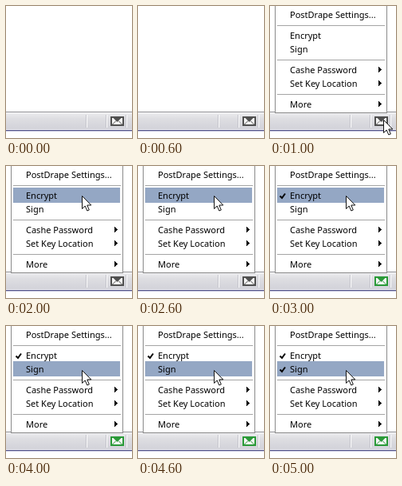
Write an HTML page that moves like this. It is 158x165 px and loops after 6000 ms.

```html
<!DOCTYPE html>
<html lang="en">
<head>
<meta charset="utf-8">
<title>Status bar mail menu</title>
<style>
  html, body { margin: 0; width: 100%; height: 100%; overflow: hidden; background: #fff; }
  svg { display: block; width: 158px; height: 165px; }
  text { font: 11px "Noto Sans", "Open Sans", sans-serif; fill: #000; }
  .crisp { shape-rendering: crispEdges; }
  .plain { color: #505050; }
  .secure { color: #2a9a38; }

  .menu, .highlight, .cursor, .tick, .secure { animation: 6s step-end infinite; }
  .menu { animation-name: open; }
  .highlight { animation-name: hover; }
  .cursor { animation-name: point; }
  .tick, .secure { animation-name: encrypt; }
  .tick.signed { animation-name: sign; }

  @keyframes open {
    0% { visibility: hidden; }
    16.666%, 100% { visibility: visible; }
  }
  @keyframes hover {
    0% { visibility: hidden; transform: none; }
    33.333% { visibility: visible; transform: none; }
    66.666%, 100% { visibility: visible; transform: translateY(17px); }
  }
  @keyframes point {
    0% { visibility: hidden; transform: translate(142px, 142px); }
    16.666% { visibility: visible; transform: translate(142px, 142px); }
    33.333% { visibility: visible; transform: translate(95px, 37px); }
    66.666%, 100% { visibility: visible; transform: translate(95px, 55px); }
  }
  @keyframes encrypt {
    0% { visibility: hidden; }
    50%, 100% { visibility: visible; }
  }
  @keyframes sign {
    0% { visibility: hidden; }
    83.333%, 100% { visibility: visible; }
  }
</style>
</head>
<body>
<svg viewBox="0 0 158 165">
  <defs>
    <linearGradient id="bar" x2="0" y2="1">
      <stop offset="0" stop-color="#efeff1"/>
      <stop offset=".4" stop-color="#dedee2"/>
      <stop offset="1" stop-color="#d2d2d9"/>
    </linearGradient>
    <path id="arrow" class="crisp" d="M0 -4L4 0L0 4Z"/>
    <path id="check" d="M0 3.5L2.5 6L6.5 .5" fill="none" stroke="#000" stroke-width="2"/>
    <g id="divider" class="crisp">
      <path d="M.5 136V152" stroke="#c2c2ca"/>
      <path d="M1.5 136V152" stroke="#fff"/>
    </g>
    <g id="envelope">
      <rect width="17" height="12" fill="currentColor"/>
      <rect x="2" y="2" width="13" height="8" fill="#f6f6f6"/>
      <path d="M3.5 2H13.5L8.5 7Z" fill="currentColor"/>
      <path d="M2 10.5L7 5.5M15 10.5L10 5.5" stroke="currentColor"/>
    </g>
  </defs>

  <!-- Status bar -->
  <g class="crisp">
    <rect y="132" width="158" height="22" fill="url(#bar)"/>
    <path d="M0 132.5H158" stroke="#8f8f94"/>
    <path d="M0 133.5H158" stroke="#fafafa"/>
    <path d="M0 154.5H158" stroke="#ececf2"/>
    <path d="M0 155.5H158" stroke="#55558a"/>
    <path d="M0 156.5H158" stroke="#c4c4dc"/>
  </g>
  <use href="#divider" x="100"/>
  <use href="#divider" x="125"/>
  <use href="#divider" x="150"/>
  <use class="plain" href="#envelope" x="131" y="138"/>
  <use class="secure" href="#envelope" x="131" y="138"/>

  <g class="menu">
    <rect class="crisp" x="6.5" y="-.5" width="140" height="134" fill="#fff" stroke="#8a8a8a"/>
    <rect class="highlight crisp" x="9" y="27" width="134" height="19" fill="#94a7c4"/>
    <path class="crisp" d="M9 24.5H144M9 67.5H144M9 110.5H144" stroke="#a5a5a5"/>
    <text x="25" y="15">PostDrape Settings...</text>
    <text x="25" y="41">Encrypt</text>
    <text x="25" y="58">Sign</text>
    <text x="25" y="84">Cashe Password</text>
    <text x="25" y="101">Set Key Location</text>
    <text x="25" y="127">More</text>
    <use href="#arrow" x="136" y="79.5"/>
    <use href="#arrow" x="136" y="96.5"/>
    <use href="#arrow" x="136" y="122.5"/>
  </g>
  <use class="tick" href="#check" x="12.5" y="34"/>
  <use class="tick signed" href="#check" x="12.5" y="51"/>

  <path class="cursor" d="M.5 .5V16.5L4.2 13L6.8 19L9.3 18L6.8 12H11.8Z" fill="#fff" stroke="#111"/>
</svg>
</body>
</html>
```
